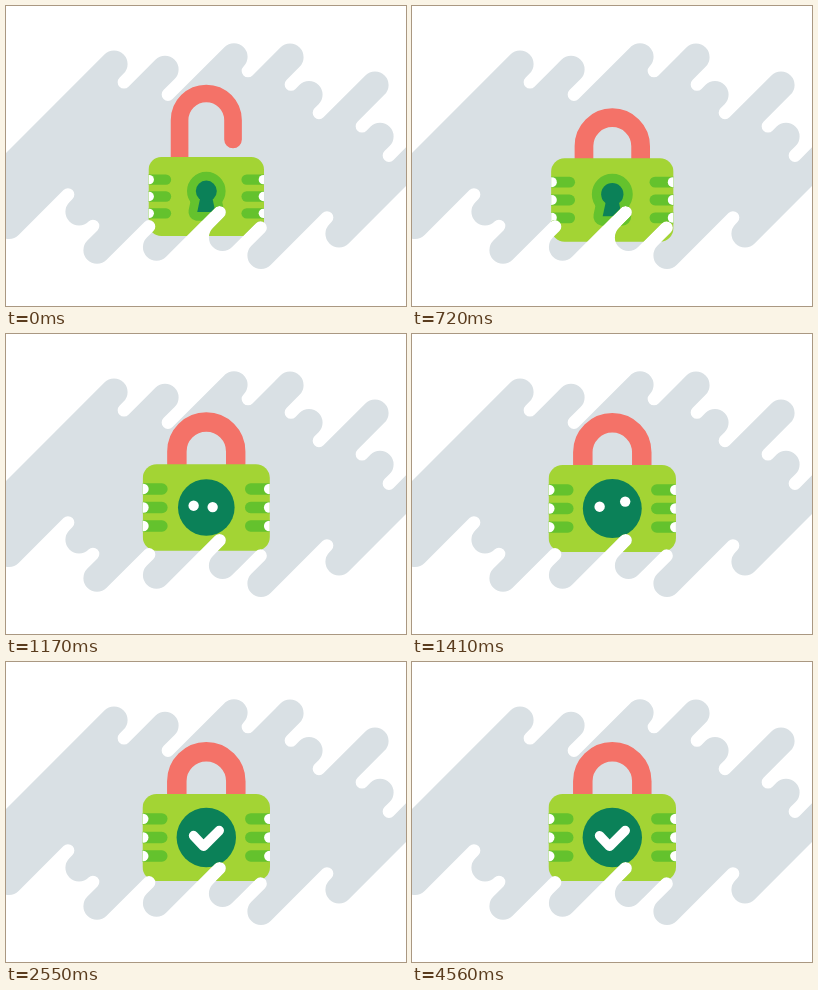
These frames come from a looping animation (400x300 px, 5430 ms). An HTML page:

```html
<!DOCTYPE html>
<html lang="en">
<head>
<meta charset="utf-8">
<title>Padlock</title>
<style>
  html, body { margin: 0; width: 100%; height: 100%; overflow: hidden; background: #fff; }
  svg { display: block; width: 100%; height: 100%; }
</style>
</head>
<body>
<svg viewBox="0 0 400 300">
  <defs>
    <clipPath id="cloudClip"><path id="cloudEdge"/></clipPath>
    <clipPath id="bodyClip"><rect x="-63.7" y="-43.5" width="127.4" height="87" rx="14"/></clipPath>
  </defs>
  <path id="cloud" fill="#d9e0e4"/>
  <g clip-path="url(#cloudClip)">
    <g id="lock">
      <path id="shackle" d="M-29.5 0V-56.2A29.5 29.5 0 0 1 29.5 -56.2V-35" fill="none"
        stroke="#f47268" stroke-width="19.5" stroke-linecap="round"/>
      <g clip-path="url(#bodyClip)">
        <rect x="-64" y="-44" width="128" height="88" fill="#a3d434"/>
        <g id="ridges"></g>
      </g>
      <g id="hole" fill="#0b8158" stroke-linejoin="round">
        <g id="rim" fill="#64c22d" stroke="#64c22d">
          <circle r="11.6"/>
          <path class="slot"/>
        </g>
        <path class="slot"/>
        <circle id="disc"/>
      </g>
      <g fill="#fff">
        <circle id="dotA"/>
        <circle id="dotB"/>
      </g>
      <path id="tick" fill="none" stroke="#fff" stroke-width="9.6" stroke-linecap="round" stroke-linejoin="round"/>
    </g>
  </g>
</svg>
<script>
const LOOP = 5430;
const $ = id => document.getElementById(id);
const set = (el, attrs) => { for (const k in attrs) el.setAttribute(k, attrs[k]); };

const clamp = v => Math.min(1, Math.max(0, v));
const prog = (t, from, to) => clamp((t - from) / (to - from));
const mix = (a, b, p) => a + (b - a) * p;
const easeOut = p => 1 - (1 - p) ** 2;
const easeInOut = p => p * p * (3 - 2 * p);
const decay = (t, from, tau) => t < from ? 1 : Math.exp((from - t) / tau);

// Diagonal cloud: evenly spaced lobes and gaps, given by the x of each round end.
function cloudPath() {
  const top = [108, 118, 159, 162, 228, 242, 284, 285, 303, 313, 369, 356, 374, 383];
  const bottom = [333, 321, 255, 254.5, 216.5, 213.5, 150.5, 143, 91, 87, 73, 62, 3];
  const end = (x, i, dir) => {
    const lobe = i % 2 === 0;
    const r = lobe ? 13.6 : 6.35;
    const y = 166 + 28.2 * i - x;
    const k = dir * r * Math.SQRT1_2;
    return `L${x - k} ${y - k}A${r} ${r} 0 0 ${lobe ? 1 : 0} ${x + k} ${y + k}`;
  };
  return 'M-20 167' + top.map((x, i) => end(x, i, 1)).join('') +
    'L420 121V160' + bottom.map((x, i) => end(x, 14 - i, -1)).join('') + 'L-20 223Z';
}

function ridges() {
  let out = '';
  for (const side of [-1, 1]) {
    for (const y of [-18.6, 0, 18.6]) {
      out += `<rect x="${side < 0 ? -70 : 38.8}" y="${y - 5.7}" width="31.2" height="11.4" rx="5.7" fill="#64c22d"/>` +
        `<circle cx="${side * 63}" cy="${y}" r="5.2" fill="#fff"/>`;
    }
  }
  return out;
}

// Tick geometry
const A = [-12.7, -1.8], V = [-2.8, 8.8], B = [12.9, -6.9];
const between = (p, q, k) => [mix(p[0], q[0], k), mix(p[1], q[1], k)];
const CORNER = 0.4;
const along = k => k < CORNER ? between(A, V, k / CORNER) : between(V, B, (k - CORNER) / (1 - CORNER));

const placeDot = (el, [cx, cy], r) => set(el, { cx, cy, r });

function lockY(t) {
  if (t < 720) return mix(15, 18.5, easeOut(prog(t, 600, 720)));
  if (t < 930) return mix(18.5, -4, easeInOut(prog(t, 720, 930)));
  return -4 * decay(t, 930, 350);
}

function shackleLift(t) {
  const up = mix(28, 39.5, easeInOut(prog(t, 0, 510)));
  return up * (1 - prog(t, 540, 690) ** 2);
}

const slots = document.querySelectorAll('.slot');

function draw(t) {
  const scale = 1 - 0.094 * decay(t, 570, 176);
  set($('lock'), { transform: `translate(200.3 ${175.5 + lockY(t)}) scale(${scale})` });
  set($('shackle'), { transform: `translate(0 ${-shackleLift(t)})` });

  // Keyhole swells into a disc
  const morph = easeInOut(prog(t, 740, 910));
  const len = 23 * (1 - morph);
  set($('hole'), { transform: `translate(0 ${-6 * (1 - morph)})` });
  set($('rim'), { 'stroke-width': 19.4 * (1 - morph) });
  slots.forEach(s => set(s, { d: `M-6 ${len * 0.18}L-10 ${len}H10L6 ${len * 0.18}Z` }));
  set($('disc'), { r: 29.7 - 18.1 * decay(t, 815, 135) });

  // One dot splits in two, then the tick joins them
  const grow = easeOut(prog(t, 880, 1120));
  const r = t < 880 ? 0 : mix(2.8, 5.2, grow);
  const slide = between([-7.5, -2.5], A, easeOut(prog(t, 940, 1140)));
  const travel = easeInOut(prog(t, 925, 1290));
  const pos = along(travel);
  const joined = t >= 1720;
  placeDot($('dotA'), slide, joined ? 0 : r);
  placeDot($('dotB'), [pos[0] + slide[0] - A[0], pos[1] + slide[1] - A[1]], joined ? 0 : r);

  const drawn = easeInOut(prog(t, 1450, 1720));
  const tip = along(drawn);
  const bend = drawn > CORNER ? `L${V}` : '';
  set($('tick'), { d: drawn > 0 ? `M${A}${bend}L${tip}` : '' });
}

set($('cloud'), { d: cloudPath() });
set($('cloudEdge'), { d: cloudPath() });
$('ridges').innerHTML = ridges();

const start = performance.now();
function frame() {
  draw((performance.now() - start) % LOOP);
  requestAnimationFrame(frame);
}
frame();
</script>
</body>
</html>
```
